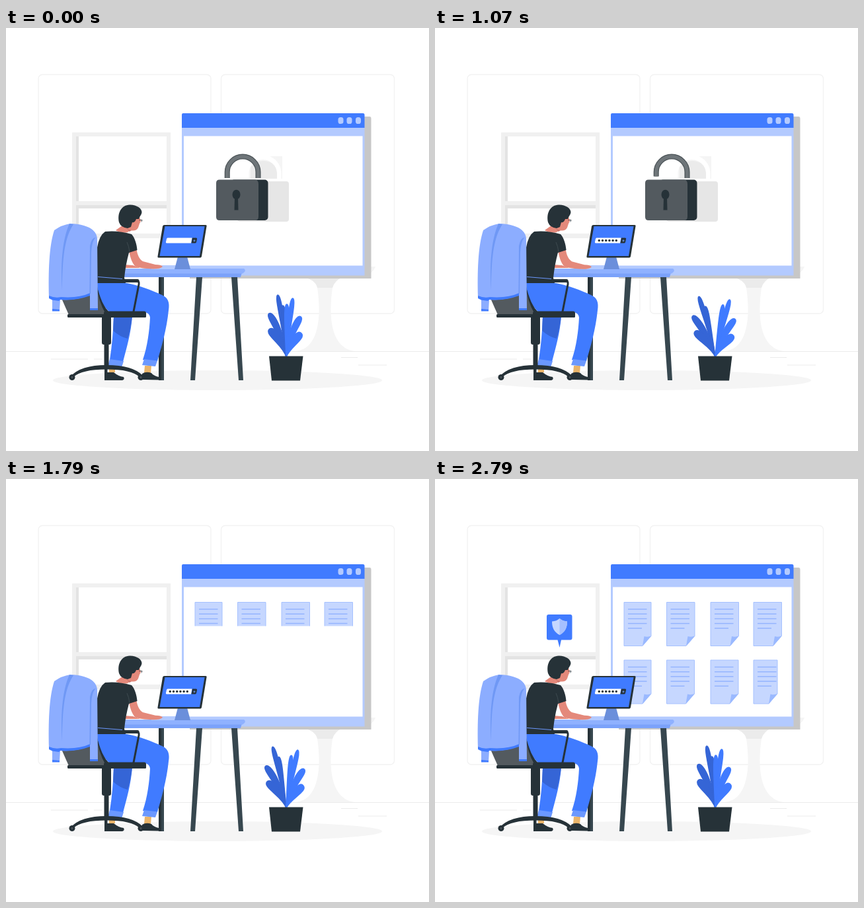
An HTML page for the animation above (2870 ms loop, 640x640 px).

```html
<!DOCTYPE html>
<html lang="en">
<head>
<meta charset="utf-8">
<title>Unlocking documents</title>
<style>
html, body { margin: 0; width: 100%; height: 100%; overflow: hidden; background: #fff; }
svg { display: block; width: 100vw; height: 100vh; }
.dark { fill: #263238; }
.blue { fill: #407bff; }
.pale { fill: #b3caff; }
.skin { fill: #e4897b; }
.line { fill: none; stroke: #263238; stroke-linecap: round; stroke-linejoin: round; }
</style>
</head>
<body>
<svg viewBox="0 0 640 640">
  <defs>
    <clipPath id="clip0"><rect x="280" y="186" width="250" height="0"/></clipPath>
    <clipPath id="clip1"><rect x="280" y="273" width="250" height="0"/></clipPath>
  </defs>

  <!-- room -->
  <g fill="none" stroke="#f2f2f2" stroke-width="1.3">
    <rect x="49" y="70.5" width="261" height="361.5" rx="6"/>
    <rect x="325.5" y="70.5" width="262" height="361.5" rx="6"/>
    <path stroke="#ebebeb" stroke-width="1" d="M0 489.5H640M68 501H124M133 501H146M507 498.5H532M533 510H576"/>
  </g>
  <path fill="#f0f0f0" d="M100 158H249V318H100Z"/>
  <path fill="#e3e3e3" d="M106 164H110V262H106ZM106 268H243V273H110V311H106Z"/>
  <path fill="#fff" d="M110 164H243V262H110ZM110 273H243V311H110Z"/>
  <ellipse cx="320" cy="533" rx="249" ry="15" fill="#f5f5f5"/>
  <path fill="#f5f5f5" d="M540 361H559Q555 372 542 375H516Q498 379 494 393C487 440 493 486 529 489H438C472 486 478 440 471 393Q468 379 442 375H540Z"/>
  <path fill="#ebebeb" d="M442 375H516Q498 379 494 393H471Q468 379 442 375Z"/>

  <!-- browser -->
  <path fill="#c7c7c7" d="M278 134H550Q552.500 134 552.500 137V379H278Z"/>
  <path class="pale" d="M266 148H542.500V374.500H266Z"/>
  <path class="blue" d="M266 151V131Q266 129 268 129H540Q542.500 129 542.500 131V151Z"/>
  <g class="pale">
    <rect x="502.500" y="135" width="8" height="10" rx="3.600"/>
    <rect x="515.500" y="135" width="8" height="10" rx="3.600"/>
    <rect x="529" y="135" width="8" height="10" rx="3.600"/>
  </g>
  <path fill="#fff" d="M269 163.500H539.500V359.500H269Z"/>

  <!-- padlock -->
  <g id="lock">
    <path fill="#f5f5f5" d="M378 194H418V228H363V212Z"/>
    <path fill="none" stroke="#fff" stroke-width="7" d="M364 228V220A24 24 0 0 1 413 220V228"/>
    <path fill="#ebebeb" d="M370 210Q378 201 390 201Q408 202 410 219V228H370Z"/>
    <rect x="350" y="232" width="78" height="61" rx="4" fill="#e6e6e6"/>
    <path class="shackle" fill="none" stroke="#4a5256" stroke-width="8"/>
    <path class="shackle" fill="none" stroke="#6e7579" stroke-width="5.500"/>
    <rect class="dark" x="340" y="229.500" width="56.500" height="61.500" rx="5"/>
    <path fill="#535a5f" d="M323 229.500H377Q382 230 382 236V285Q382 291 377 291H323Q318 291 318 286V234.500Q318 229.500 323 229.500Z"/>
    <ellipse class="dark" cx="348.500" cy="252" rx="6" ry="7.300"/>
    <path class="dark" d="M346 256H351L351.500 275.500H345.500Z"/>
  </g>
  <g id="row0" clip-path="url(#clip0)"></g>
  <g id="row1" clip-path="url(#clip1)"></g>

  <!-- desk -->
  <path fill="#37474f" d="M231 377H239V533H231ZM288 377H297L286 533H279ZM341 377H350L359 533H352Z"/>
  <path fill="#263238" d="M231 377H235V533H231Z"/>
  <path fill="#7ba2fa" d="M178 370H357L355 377H178Z"/>
  <path fill="#8fb1ff" d="M178 364H360Q363 366 361 369L358 371.500H178Z"/>

  <!-- legs and chair -->
  <path class="blue" d="M163 436H191C189 462 183 482 177 505L157 502Q162 470 163 436Z"/>
  <path fill="#3565d6" d="M163 436H191Q189 454 184 470Q172 467 162 458Z"/>
  <path fill="#6b98ff" d="M157 501L178 504L175 513.500L154 511Z"/>
  <path fill="#e9b46a" d="M156 511H165V521H156ZM210 511H220L219 522H209Z"/>
  <path class="dark" d="M150 533V521H163Q170 527 178 528Q180 532 176 533Z"/>
  <path fill="#535a5f" d="M80 400L95 434H152L140 385Z"/>
  <path class="blue" d="M138 385H178C202 389 221 397 236 404C245 408 248 415 246 427C243 456 236 480 229 504L207 502C214 482 217 458 218 438Q217 431 210 430H157C145 420 138 402 138 385Z"/>
  <path fill="#6b98ff" d="M209 501L229 503.500L226 512L206 510Z"/>
  <path class="dark" d="M206 532V523Q212 519 220 522Q223 526 231 528Q234 532 231 532.500ZM137 388C142 408 148 424 158 431H150Q140 414 137 388Z"/>
  <rect class="dark" x="93" y="433" width="119" height="5" rx="1.500"/>
  <rect class="dark" x="148" y="428.500" width="64" height="9.500" rx="3"/>
  <path class="dark" d="M145 437H159V476Q159 479 156 479H148Q145 479 145 476ZM148.500 478H155.500V515H148.500ZM149 515H153.500V533H149Z"/>
  <path class="dark" d="M98 527Q113 510 152 510Q192 510 207 526L202 528Q190 516.500 152 516.500Q115 516.500 102 528Z"/>
  <circle class="dark" cx="100" cy="528.500" r="4.500"/>
  <circle class="dark" cx="204" cy="528.500" r="4.500"/>
  <circle cx="100" cy="528.500" r="1.300" fill="#535a5f"/>
  <circle cx="204" cy="528.500" r="1.300" fill="#535a5f"/>

  <!-- person -->
  <path class="skin" d="M178 358L192 359L203 363H180Z"/>
  <path class="pale" d="M220 363L236 359H261Q264 362 260 365H220Z"/>
  <g id="arm">
    <path class="skin" d="M186 337L197.500 335C199 344 202 350 207 353L226 358Q235 358 237 361Q234 364.500 222 364.500C210 364 200 363 195 360C190 354 188 347 186 337Z"/>
  </g>
  <path class="skin" d="M180 296L166 306Q174 311 184 309L188 306Q197 308 200 302L202 296L204 292L201 282L190 283Z"/>
  <path fill="#c96f66" d="M182 303Q186 306 190 306L187 308Z"/>
  <path class="dark" d="M171 294C168 279 175 268 187 267.500C197 267 206 273 205.500 279C205 283 202 285 201 289L197 289Q195 295 191 294L189 301L184 303Q174 302 171 294Z"/>
  <path class="line" stroke-width=".8" d="M202 290.500L206 290.500L205 293"/>
  <path class="dark" d="M150 308Q170 306 190 312C195 317 198 328 198.500 336L186 340Q181 358 179 378L181 386H138V332Q141 314 150 308Z"/>
  <path fill="none" stroke="#455156" stroke-width=".8" d="M187 339Q186 330 183 324"/>
  <path fill="none" stroke="#6b98ff" stroke-width="1" d="M139 376.500L176 379.500"/>
  <path class="line" stroke-width="3" d="M178 382H197Q202 383 201 388L193 429"/>
  <path class="line" stroke-width="5" d="M179 382.500H199"/>

  <!-- jacket -->
  <path fill="#8cadff" d="M73 306Q84 298 97 296Q109 296 118 299Q136 304 138 318L139 427H127V403Q108 413 82 411L81 428H70V411L65 407C64 370 65 330 73 306Z"/>
  <path class="blue" d="M65 405Q74 409 83 407Q110 409 127 401V405Q106 413 82 411L80 413L70 411.500L65 409ZM70 425L81 426V428.500H70ZM127 424H139V427H127Z"/>
  <path fill="#6f98f5" d="M102 297C91 314 85 338 85 397C82 348 87 316 96 296ZM127 330Q129 317 136 317Q130 321 129 340L128 402H126.500Z"/>

  <!-- monitor -->
  <path fill="#6b8fdb" d="M260 346H274L279 365H255Z"/>
  <path class="dark" d="M239.500 298H302Q304 298 303.500 300L296 345.500Q295.500 347.500 294 347.500H231Q229 347.500 229.500 345.500L237 300Q237.500 298 239.500 298Z"/>
  <path class="blue" d="M240.500 300H300.500L293 345H232.500Z"/>
  <path fill="#fff" d="M244.500 317.500H281.500L280 325.500H243Q241.500 325 242 323.500L243 319Q243.500 317.500 244.500 317.500Z"/>
  <path class="dark" d="M282 317.500H288Q289.500 318 289 319.500L288 324Q287.500 325.500 286 325.500H280.500Z"/>
  <circle cx="285" cy="321.800" r="1.500" fill="#6084c9"/>
  <g id="dots" class="dark"></g>

  <!-- plant -->
  <g stroke-width="1.600" stroke-linejoin="round">
    <g id="left" fill="#3565d6" stroke="#3565d6"></g>
    <g id="right" fill="#407bff" stroke="#407bff"></g>
  </g>
  <path class="dark" d="M398 496.500H449.500L445 533.500H402Z"/>

  <!-- bubble -->
  <g id="bubble">
    <path class="blue" d="M172 205H204.500Q207.500 205 207.500 208V240.500Q207.500 243.500 204.500 243.500H191L188.500 255L185.500 243.500H172Q169 243.500 169 240.500V208Q169 205 172 205Z"/>
    <path fill="#c6d7ff" d="M188.500 211Q193 215 200 215.500C200 226 196 232 188.500 236C181 232 177 226 177 215.500Q184 215 188.500 211Z"/>
    <path fill="#a5c0ff" d="M188.500 211Q193 215 200 215.500C200 226 196 232 188.500 236Z"/>
  </g>
</svg>
<script>
const LOOP = 2870, FRAME = LOOP / 40;
const $ = id => document.getElementById(id);
const ramp = (t, from, span) => Math.min(1, Math.max(0, (t - from) / span));
const ease = x => (1 - Math.cos(Math.PI * x)) / 2;

function add(parent, tag, attrs) {
  const el = document.createElementNS("http://www.w3.org/2000/svg", tag);
  for (const key in attrs) el.setAttribute(key, attrs[key]);
  return parent.appendChild(el);
}

function addPage(row, x, y, w) {
  const page = add(row, "g", { transform: `translate(${x} ${y})` });
  add(page, "path", { d: `M0 0H${w}V51L${w - 13} 66H0Z`, fill: "#c6d7ff", stroke: "#a6c1ff" });
  add(page, "path", { d: `M${w - 13} 66L${w - 10.5} 51.5Q${w - 5} 53 ${w} 51Z`, fill: "#9ab9ff" });
  for (let i = 0; i < 5; i++) {
    add(page, "path", { d: `M6 ${10.5 + i * 7.2}H${i < 4 ? 34.5 : 27}`, stroke: "#94b4ff", "stroke-width": 1.5 });
  }
}

// A leaf grows from the pot, bends at (bx, by) and widens towards its tip.
function addLeaf(group, x, y, bx, by, w) {
  const len = Math.hypot(x - bx, y - by);
  const px = (by - y) / len * w, py = (x - bx) / len * w;
  const side = s => [`${bx + px * s * .4} ${by + py * s * .4}`, `${x + px * s * 1.2} ${y + py * s * 1.2}`];
  const [a, b] = side(1), [c, d] = side(-1);
  add(group, "path", { d: `M424 498C${a} ${b} ${x} ${y}C${d} ${c} 424 498Z` });
}

[286, 350.5, 417, 482].forEach((x, i) => {
  addPage($("row0"), x, 186.5, i ? 42.5 : 41);
  addPage($("row1"), x, 274, i === 3 ? 36 : i ? 42 : 41);
});
for (let i = 0; i < 6; i++) add($("dots"), "circle", { cx: 248.3 + i * 5.2, cy: 321.5, r: 1.7 });

[[411, 404, 421, 452, 5], [398, 432, 420, 464, 7.5], [398, 456, 422, 477, 9], [419, 420, 421, 455, 4.5]]
  .forEach(leaf => addLeaf($("left"), ...leaf));
[[434, 409, 427, 455, 5], [446, 437, 427, 464, 7.5], [447, 462, 427, 480, 9], [425, 418, 424, 455, 4.5]]
  .forEach(leaf => addLeaf($("right"), ...leaf));

const shackles = document.querySelectorAll(".shackle");
const dots = [...$("dots").children];
const turn = (id, deg, x, y) => $(id).setAttribute("transform", `rotate(${deg} ${x} ${y})`);
const reveal = (id, h) => $(id).firstElementChild.setAttribute("height", h);

function draw(t) {
  const sway = t < 2500 ? ease(t / 1250) : 0;
  turn("left", -7.8 * sway, 424, 497);
  turn("right", 8.3 * sway, 424, 497);
  turn("arm", .8 * Math.sin(t * Math.PI / 250), 196, 356);

  dots.forEach((dot, i) => dot.setAttribute("opacity", t >= 95 * (i + 1) ? 1 : 0));

  const end = 227 - 8 * ease(ramp(t, 1000, 200));
  shackles.forEach(s => s.setAttribute("d", `M334.700 ${end}V218A23.400 23.400 0 0 1 381.500 218V227`));
  $("lock").setAttribute("opacity", 1 - ramp(t, 1270, 280));

  reveal("clip0", 67 * ease(ramp(t, 1670, 234)));
  reveal("clip1", 68 * ease(ramp(t, 2045, 270)));
  $("bubble").setAttribute("opacity", ramp(t, 2400, 330));
}

// The clip runs at forty steps per loop.
function tick() {
  const t = performance.now() % LOOP;
  draw(Math.floor((t + 12) / FRAME) % 40 * FRAME);
  requestAnimationFrame(tick);
}
tick();
</script>
</body>
</html>
```
